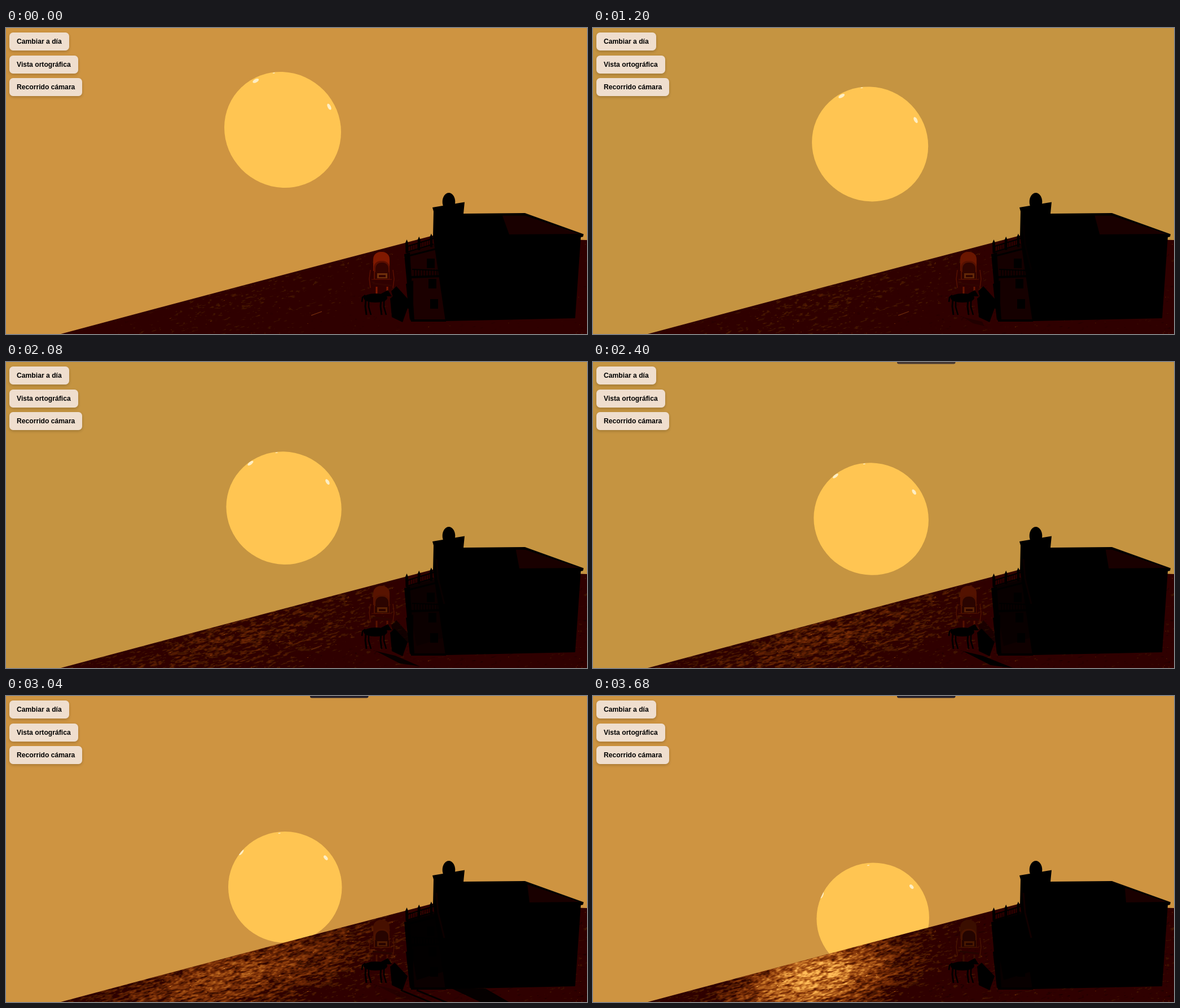
Animation of 1030x544 px, one loop 3.76 s. Source, as an HTML page with a canvas:

```html
<!DOCTYPE html>
<html lang="es">
<head>
<meta charset="utf-8">
<title>Atardecer</title>
<style>
html, body { margin: 0; width: 1030px; height: 544px; overflow: hidden; background: #ce9441; }
canvas { position: absolute; left: 0; top: 0; }
nav {
  position: absolute; left: 6px; top: 8px;
  display: flex; flex-direction: column; align-items: flex-start; gap: 8.5px;
}
.btn {
  padding: 0 13px; border-radius: 6.5px; background: #efdece; color: #000; white-space: nowrap;
  font: bold 12.16px/32px "Liberation Sans", Arial, sans-serif;
  box-shadow: 0 2px 5px rgba(0, 0, 0, .2);
}
</style>
</head>
<body>
<canvas id="stage" width="1030" height="544"></canvas>
<nav>
  <div class="btn">Cambiar a día</div>
  <div class="btn">Vista ortográfica</div>
  <div class="btn">Recorrido cámara</div>
</nav>
<script>
const W = 1030, H = 544, TOP = 366, GH = H - TOP;
const LOOP = 3760, STEP = 80, LAST = 44;
const ctx = document.getElementById('stage').getContext('2d');
const groundCanvas = document.createElement('canvas');
groundCanvas.width = W;
groundCanvas.height = GH;
const groundCtx = groundCanvas.getContext('2d');
const groundImage = groundCtx.createImageData(W, GH);

const lerp = (a, b, k) => a + (b - a) * k;
const clamp = v => Math.max(0, Math.min(1, v));
const mix = (a, b, k) => `rgb(${a.map((v, j) => Math.round(lerp(v, b[j], k))).join()})`;

// --- ground texture -------------------------------------------------
const COS = Math.cos(.26), SIN = Math.sin(.26);

function hash(x, y) {
  let h = Math.imul(x, 374761393) ^ Math.imul(y, 668265263);
  h = Math.imul(h ^ (h >>> 13), 1274126177);
  return ((h ^ (h >>> 16)) >>> 0) / 4294967296;
}

function noise(x, y) {
  const ix = Math.floor(x), iy = Math.floor(y);
  let fx = x - ix, fy = y - iy;
  fx *= fx * (3 - 2 * fx);
  fy *= fy * (3 - 2 * fy);
  return lerp(lerp(hash(ix, iy), hash(ix + 1, iy), fx),
              lerp(hash(ix, iy + 1), hash(ix + 1, iy + 1), fx), fy);
}

const grain = new Float32Array(W * GH);
for (let y = 0; y < GH; y++) {
  for (let x = 0; x < W; x++) {
    const u = x * COS - y * SIN, v = x * SIN + y * COS;
    const speck = hash(x >> 1, y + 900) > .998 ? .45 : 0;
    grain[y * W + x] = .55 * noise(u / 11, v / 3) + .45 * noise(u / 4 + 70, v / 1.7) - .5 + speck;
  }
}

// from near black through red brown to bright orange
function heat(v) {
  const s = clamp((v - .31) / .69), dim = Math.min(1, .3 + v * 4.5);
  return [
    dim * (47 + 208 * s ** .9),
    16 * Math.min(1, s * 20) + 172 * s ** 1.5,
    88 * s ** 2.2
  ];
}
const palette = Array.from({ length: 256 }, (_, n) => heat(n / 255));

function shadeGround(q) {
  const glow = .05 + .57 * q ** 3.5;
  const cx = lerp(430, 395, q), cy = lerp(485, 503, q);
  const reach = lerp(260, 145, q ** 8), depth = lerp(75, 62, q);
  const data = groundImage.data;
  for (let y = 0, p = 0; y < GH; y++) {
    for (let x = 0; x < W; x++, p++) {
      const dx = x - cx, dy = y + TOP - cy;
      const u = (dx * COS - dy * SIN) / reach, v = (dx * SIN + dy * COS) / depth;
      const lit = glow * Math.exp(-u * u - v * v);
      const level = .215 + lit + grain[p] * (.25 + .12 * q + .75 * lit);
      const c = palette[Math.round(clamp(level) * 255)];
      data.set(c, p * 4);
      data[p * 4 + 3] = 255;
    }
  }
  groundCtx.putImageData(groundImage, 0, 0);
}

// --- drawing helpers ------------------------------------------------
function trace(points) {
  ctx.beginPath();
  for (let j = 0; j < points.length; j += 2) ctx.lineTo(points[j], points[j + 1]);
}
function poly(color, ...points) {
  trace(points);
  ctx.fillStyle = color;
  ctx.fill();
}
function line(color, width, ...points) {
  trace(points);
  ctx.strokeStyle = color;
  ctx.lineWidth = width;
  ctx.stroke();
}
function rect(color, x, y, w, h) {
  ctx.fillStyle = color;
  ctx.fillRect(x, y, w, h);
}
function oval(color, x, y, rx, ry, turn = 0) {
  ctx.beginPath();
  ctx.ellipse(x, y, rx, ry, turn, 0, 7);
  ctx.fillStyle = color;
  ctx.fill();
}
function arch(color, x, y, w, h, round) {
  ctx.beginPath();
  ctx.roundRect(x, y, w, h, [round, round, 0, 0]);
  ctx.fillStyle = color;
  ctx.fill();
}
function faded(alpha, draw) {
  ctx.save();
  ctx.globalAlpha *= clamp(alpha);
  draw();
  ctx.restore();
}

// --- sun ------------------------------------------------------------
function drawSun(q) {
  const p = q * q + .11 * q ** 1.6 * (1 - q ** 12);
  const cx = lerp(490.5, 496.2, p), cy = lerp(181, 395, p);
  const rx = lerp(103.5, 99.8, p), ry = 98.5 + 4.5 * (1 - p) ** 2;
  const skew = lerp(4, -1, p);
  ctx.save();
  ctx.save();
  ctx.transform(rx, skew, 0, Math.sqrt(ry * ry - skew * skew), cx, cy);
  oval('#ffc552', 0, 0, 1, 1);
  ctx.restore();
  ctx.clip();

  const shine = '#fdeec4';
  const a = (61.1 - 12.4 * p - 24.6 * p * p) * Math.PI / 180;
  oval(shine, cx - 98.8 * Math.cos(a), cy - 99.5 * Math.sin(a), 6, lerp(3, 2, p), a - Math.PI / 2);
  oval(shine, cx + lerp(82.5, 68.5, p), cy - lerp(41, 56, p), lerp(6, 4.5, p), 2.8, lerp(1.1, .85, p));
  oval(shine, cx - lerp(15.5, 8, p), cy - lerp(101, 94, p), 2.2, .7, -.1);
  ctx.restore();
}

// --- ground, wagon, horse, house -------------------------------------
function drawGround(q) {
  shadeGround(q);
  ctx.save();
  ctx.beginPath();
  ctx.moveTo(97, 544);
  ctx.quadraticCurveTo(430, 454.5, 757, 369);
  ctx.lineTo(W, 377);
  ctx.lineTo(W, H);
  ctx.clip();
  ctx.drawImage(groundCanvas, 0, TOP);
  line(mix([125, 50, 14], [95, 38, 8], q), 1.2, 541, 511, 560, 504);

  // cast shadows creep right as the sun sinks
  const reach = clamp(q * 2.2 - .4);
  faded(Math.min(reach, (.86 - q) * 5), () =>
    poly('#000', 656, 514, 690, 522, 672 + reach * 73, 524 + reach * 20, 660 + reach * 45, 519 + reach * 20));
  faded(Math.min((q - .64) * 5, (1 - q) * 6), () => {
    for (const x of [700, 728]) line('#000', 3, x, 523, x + 56, 546);
    poly('#000', 790, 520, 850, 520, 895, 546, 845, 546);
  });
  ctx.restore();
}

function drawWagon(q) {
  const cover = mix([128, 25, 0], [58, 14, 0], q);
  const rim = mix([92, 15, 0], [72, 20, 0], q);
  const dark = mix([52, 4, 0], [36, 4, 0], q);
  arch(cover, 651, 398, 29, 34, 13);
  arch(rim, 652, 414, 28, 33, 12);
  arch(dark, 655, 417, 23, 19, 10);
  rect(dark, 654, 434, 25, 12);
  rect(mix([112, 48, 10], [72, 24, 0], q), 658, 436, 18, 9);
  rect(dark, 661, 439, 12, 4);
  line(rim, 1, 648, 447, 684, 447);
  line(dark, 3, 650, 454, 684, 458);
  for (const side of [-1, 1]) {
    line(rim, 1.5, 666 + side * 20, 430, 666 + side * 22, 446, 666 + side * 20, 462);
    rect(cover, 665 + side * 9.5, 460, 3, 12);
  }
}

function drawHorse(q) {
  oval('#000', 655, 480, 21, 8);
  poly('#000', 662, 474, 677, 466, 684, 477, 675, 477, 671, 487);
  line('#000', 2.5, 637, 475, 632, 479, 631, 487);
  for (const x of [638, 665]) {
    line('#000', 3, x, 481, x - 1, 495, x + 1, 510);
    line('#000', 2.5, x + 5, 484, x + 5, 496, x + 9, 510);
  }
  poly('#000', 681, 481, 689, 474, 712, 498, 703, 523, 684, 514);
  faded(2.35 - 3 * q, () => poly('#000', 683, 468, 692, 459, 719, 489, 717, 500, 690, 492));
}

function drawPorch(q) {
  poly(mix([27, 0, 0], [8, 0, 0], q), 710, 398, 765, 383, 780, 522, 720, 522);
  for (const y of [389, 399]) line('#000', 2, 709, y, 758, y - 15);
  for (let x = 713; x < 757; x += 4) line('#000', 1, x, 605 - x * .305, x, 614 - x * .305);
  for (let n = 0; n < 3; n++) {
    const x = 710.5 + n * 21.7, y = 376 - n * 5.3;
    poly('#000', x, y, x + 2.5, y + 6, x + 2, y + 24, x - 2, y + 24, x - 2.5, y + 6);
  }
  poly('#000', 706, 402, 716, 399, 724, 520, 717, 520);
  line('#000', 3, 714, 405, 765, 392);
  line('#000', 2, 720, 429, 766, 431);
  line('#000', 4, 718, 443, 772, 441);
  for (let x = 724; x < 768; x += 5) line('#000', 1.5, x, 429, x, 443);
  for (let n = 0; n < 3; n++) rect('#000', 746 + n * 3, 410 + n * 36, 14, 17);
  poly('#000', 709, 455, 722, 449, 722, 492, 716, 520);
  line('#000', 4, 718, 520, 780, 520);
  faded((q - .4) * 2, () => poly('#000', 710, 400, 765, 386, 776, 490, 728, 505));
}

function drawHouse(q) {
  drawPorch(q);
  poly('#000', 756, 319, 813, 309.5, 811, 330, 920, 329, 1024, 366.5, 1023, 371, 1019, 372,
    1009, 516, 779, 521, 757, 370, 758, 326);
  oval('#000', 785, 309, 11.3, 16);
  const edge = 880 + 14 * q + 49 * q * q;
  const ridge = x => 333.5 + Math.max(0, x - 920) * .33;
  const mid = Math.max(920, edge);
  poly('#190000', edge, ridge(edge), mid, ridge(mid), 1017, 366, edge + lerp(12, 2, q), 367);
  faded(q, () => line('#110000', 3, 763, 350, 766, 385, 777, 430));
}

function drawToolbar(color) {
  ctx.beginPath();
  ctx.roundRect(539, -6, 103.5, 9.6, 3);
  ctx.fillStyle = color;
  ctx.fill();
}

function drawScene(n) {
  // two steps of the cycle hold still
  const q = (n - (n >= 6) - (n >= 29)) / LAST;
  const dull = n >= 4 && n < 34;
  rect(dull ? '#c59441' : '#ce9441', 0, 0, W, H);
  if (n >= 28) drawToolbar(dull ? '#463832' : '#26202a');
  drawSun(q);
  drawGround(q);
  drawWagon(q);
  drawHorse(q);
  drawHouse(q);
}

let shown = -1;
function tick() {
  const n = Math.floor(performance.now() % LOOP / STEP);
  if (n !== shown) drawScene(shown = n);
  requestAnimationFrame(tick);
}
tick();
</script>
</body>
</html>
```
